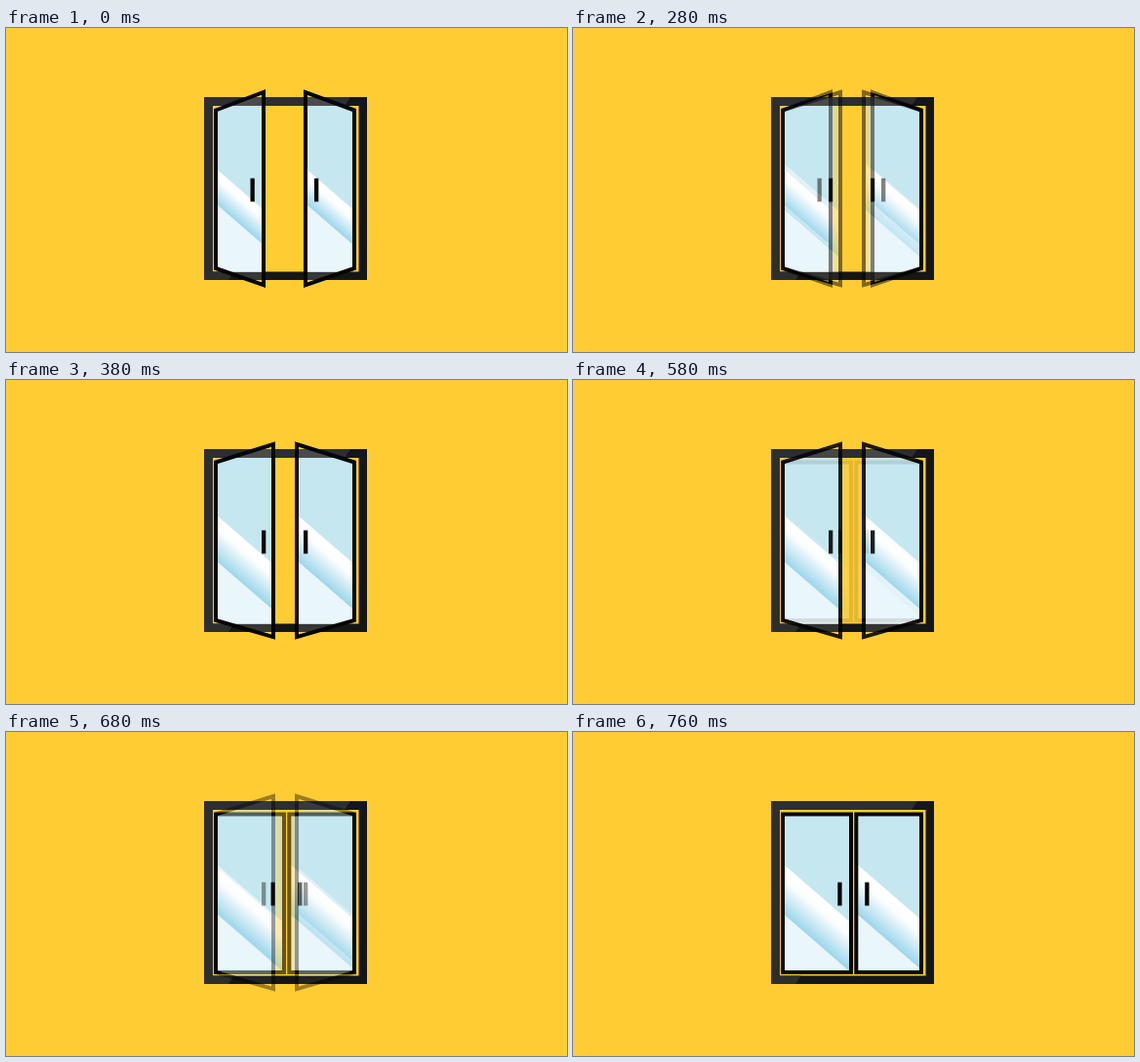
These frames come from a looping animation (575 px wide and 333 px high, 1260 ms). An HTML page with a canvas:

```html
<!DOCTYPE html>
<html lang="en">
<head>
<meta charset="utf-8">
<title>Closing doors</title>
<style>
  html, body { margin: 0; height: 100%; overflow: hidden; background: #ffcc33; }
  canvas { display: block; }
</style>
</head>
<body>
<canvas id="stage" width="575" height="333"></canvas>
<script>
const W = 575, H = 333, LOOP = 1260;
const TOP = 84.5, BOTTOM = 247, SLOPE = 0.87;

function trace(c, points) {
  c.beginPath();
  points.forEach(([x, y]) => c.lineTo(x, y));
  c.closePath();
}

function drawFrame(c) {
  c.fillStyle = '#ffcc33';
  c.fillRect(0, 0, W, H);
  c.save();
  c.beginPath();
  c.rect(203, 71, 167, 188);
  c.rect(212, 80, 149.5, 170.5);
  c.clip('evenodd');
  c.fillStyle = '#161616';
  c.fillRect(203, 71, 167, 188);
  c.fillStyle = '#2e2e2e';
  trace(c, [[203, 71], [353, 71], [228, 259], [203, 259]]);
  c.fill();
  c.restore();
}

// hinge and edge are the x centres of the two uprights; swing is the rise of the free edge
function drawDoor(c, hinge, edge, swing, shineTop, shineBottom, handle) {
  const outline = [[hinge, TOP], [edge, TOP - swing], [edge, BOTTOM + swing * 0.93], [hinge, BOTTOM]];
  const left = Math.min(hinge, edge) + 2, right = Math.max(hinge, edge) - 2;
  const drop = (right - left) * SLOPE, h = shineBottom - shineTop;

  c.save();
  trace(c, outline);
  c.clip();
  c.fillStyle = 'rgba(230,240,240,0.15)';
  c.fillRect(0, 0, W, H);
  c.beginPath();
  c.rect(left - 2, 80, right - left + 4, 170.5);
  c.clip();
  c.fillStyle = '#c5e7f0';
  c.fillRect(0, 0, W, H);
  c.fillStyle = '#e9f6fc';
  trace(c, [[left, shineBottom], [right, shineBottom + drop], [right, H], [left, H]]);
  c.fill();

  const k = h / (1 + SLOPE * SLOPE);
  const shine = c.createLinearGradient(left, shineTop, left - k * SLOPE, shineTop + k);
  shine.addColorStop(0, '#ffffff');
  shine.addColorStop(0.3, '#fbfdfe');
  shine.addColorStop(1, '#9bd6eb');
  c.fillStyle = shine;
  trace(c, [[left, shineTop], [right, shineTop + drop], [right, shineBottom + drop], [left, shineBottom]]);
  c.fill();
  c.restore();

  c.strokeStyle = c.fillStyle = '#050505';
  c.lineWidth = 4;
  trace(c, outline);
  c.stroke();
  c.fillRect(handle, 154.5, 4.3, 24);
}

function makePose(edges, swing, shine, handles) {
  const canvas = document.createElement('canvas');
  canvas.width = W;
  canvas.height = H;
  const c = canvas.getContext('2d');
  drawFrame(c);
  drawDoor(c, 215, edges[0], swing, ...shine, handles[0]);
  drawDoor(c, 357, edges[1], swing, ...shine, handles[1]);
  return canvas;
}

const open = makePose([264, 307], 18.5, [146, 182], [250.5, 316]);
const ajar = makePose([274, 298], 18.5, [140, 187], [262, 305]);
const shut = makePose([285, 290.3], 0, [137, 188], [271.3, 299.2]);

const ctx = document.getElementById('stage').getContext('2d');

// ten equal steps of 20 ms, the first one at the start time
const fade = (t, start) => Math.max(0, Math.min(10, Math.floor((t - start) / 20) + 1)) / 10;

function layer(pose, alpha) {
  ctx.globalAlpha = alpha;
  ctx.drawImage(pose, 0, 0);
}

function render() {
  const t = performance.now() % LOOP;
  layer(open, 1);
  layer(ajar, fade(t, 200));
  layer(shut, fade(t, 580));
  requestAnimationFrame(render);
}
render();
</script>
</body>
</html>
```
